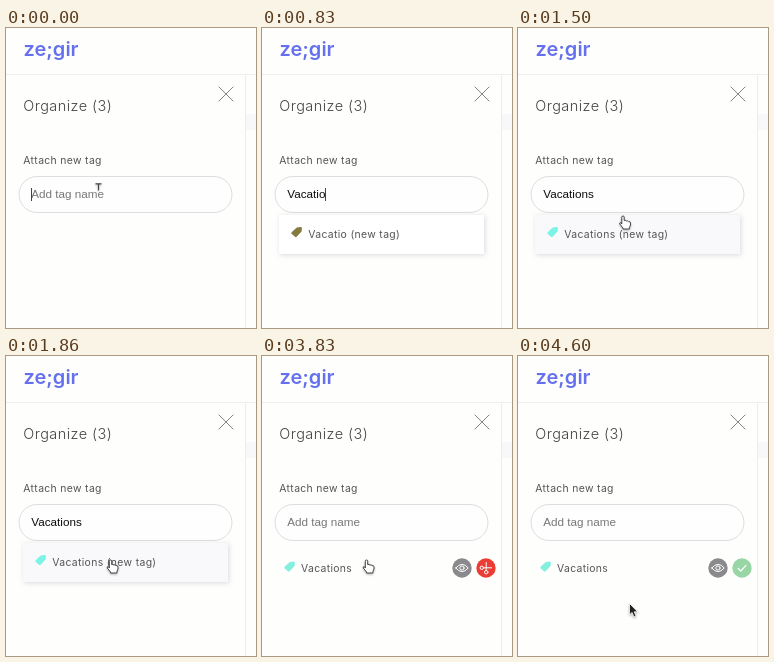
An HTML page for the animation above (4630 ms loop, 250 by 300 pixels).

```html
<!DOCTYPE html>
<html lang="en">
<head>
<meta charset="utf-8">
<title>Attach a tag</title>
<style>
  html, body { margin: 0; width: 100%; height: 100%; overflow: hidden; background: #fefefd; }
  svg { display: block; width: 250px; height: 300px; font: 10.4px Inter, sans-serif; letter-spacing: .34px; fill: #555; }
  .logo { font-size: 20px; font-weight: 600; letter-spacing: 0; fill: #6470ee; }
  .title { font-size: 14.5px; font-weight: 300; letter-spacing: .45px; fill: #444; }
  .field { font: 11.7px "Liberation Sans", Arial, sans-serif; letter-spacing: 0; }
  .box { filter: drop-shadow(1px 1px 2.5px rgba(70, 70, 110, .2)); }
  .line { fill: none; stroke-linecap: round; stroke-linejoin: round; }
  #cursor { filter: drop-shadow(0 1px 1px rgba(0, 0, 0, .3)); }
</style>
</head>
<body>
<svg viewBox="0 0 250 300">
  <defs>
    <path id="tag" d="M5.8 .6 9.6 0Q10.8 0 10.9 1.2L10.6 4.6 5.6 9.8Q4.8 10.5 4 9.8L.6 6.7Q-.1 6 .6 5.3Z"/>
  </defs>

  <rect width="250" height="300" fill="#fefefd"/>
  <path d="M0 46.5H250" stroke="#efeff0"/>
  <path d="M239.5 47V300" stroke="#eeeeef"/>
  <rect x="240" y="86" width="10" height="16" fill="#f8f8fb"/>

  <text class="logo" x="17.5" y="28">ze;gir</text>
  <text class="title" x="17.3" y="83.3">Organize (3)</text>
  <path d="M213 59 227 73M227 59 213 73" class="line" stroke="#777" stroke-width=".9"/>
  <text x="17.3" y="136">Attach new tag</text>

  <rect x="13" y="148.5" width="213" height="36" rx="18" fill="#fefefe" stroke="#dededf"/>
  <text id="value" class="field" x="25.3" y="170"></text>
  <rect id="caret" y="160" width="1" height="13" fill="#444"/>

  <g id="drop">
    <rect id="option" class="box" x="17" y="187" width="205" height="39"/>
    <use id="swatch" href="#tag" x="29" y="199"/>
    <text id="label" x="46.3" y="210"></text>
  </g>

  <g id="row">
    <use href="#tag" x="22" y="205.5" fill="#84eedf"/>
    <text x="39" y="215.7">Vacations</text>
    <circle cx="200" cy="212" r="9.7" fill="#8a898b"/>
    <g class="line" stroke="#fff">
      <path d="M193.8 212Q200 204.6 206.2 212Q200 219.4 193.8 212Z"/>
      <circle cx="200" cy="212" r="2.1"/>
    </g>
    <g id="cut">
      <circle cx="224" cy="212" r="9.7" fill="#ea3e35"/>
      <g class="line" stroke="#fff">
        <path d="M221.5 211.8H229.5M224.2 214.5V206.5"/>
        <circle cx="219.8" cy="211.8" r="1.7"/>
        <circle cx="224.2" cy="216.2" r="1.7"/>
      </g>
    </g>
    <g id="done">
      <circle cx="224" cy="212" r="9.7" fill="#98d6a6"/>
      <path d="M220 212.3 222.8 215 228 209.3" class="line" stroke="#fff" stroke-width="1.2"/>
    </g>
  </g>

  <g id="cursor">
    <path id="beam" class="line" stroke="#444" stroke-width="1.2" d="M-2.6-3.2H2.6M0-3V3"/>
    <path id="hand" fill="#fff" stroke="#444" stroke-linejoin="round"
      d="M-1.2 8V1.2Q-1.2 0 0 0T1.2 1.2V4.6Q2.6 4 3.4 5Q4.8 4.4 5.5 5.600Q7.300 5.100 7.500 7V9L6.400 11.500V13H0V12L-3.200 8Q-3.600 6.600 -2.300 6.600Z"/>
    <path id="arrow" fill="#222" stroke="#fff" stroke-width=".8" stroke-linejoin="round"
      d="M0 0V11.300L2.600 9 4.400 13.500 6.500 12.600 4.700 8.300H8.200Z"/>
  </g>
</svg>
<script>
const LOOP = 4630;
const WORD = "Vacations";
const $ = id => document.getElementById(id);
const show = (id, on) => { $(id).style.display = on ? "" : "none"; };

// time of each keystroke and the colour of its suggestion
const keys = [
  [130, "#e0a05c"], [260, "#b88ae0"], [400, "#6aa8e8"],
  [530, "#84ee9f"], [700, "#d884a8"], [765, "#8a92d8"],
  [830, "#857a40"], [960, "#a8cc70"], [1060, "#7cf3e4"]
];

// time, x, y of the pointer
const path = [
  [0, 92.5, 159], [1400, 92.5, 159], [1500, 105, 188], [1530, 105, 188.5],
  [1860, 104.5, 204], [4430, 104.5, 204], [4600, 111.5, 247.5], [LOOP, 111.5, 247.5]
];

function pointer(t) {
  const i = path.findIndex(p => p[0] > t);
  const [t0, x0, y0] = path[i - 1], [t1, x1, y1] = path[i];
  const k = (t - t0) / (t1 - t0);
  return [x0 + (x1 - x0) * k, y0 + (y1 - y0) * k];
}

const pen = document.createElement("canvas").getContext("2d");
pen.font = '11.7px "Liberation Sans", Arial, sans-serif';

function draw(t) {
  const picked = t >= 2700, added = t >= 3830;
  const count = picked ? 0 : keys.filter(k => t >= k[0]).length;
  const typed = WORD.slice(0, count);
  const [x, y] = pointer(t);

  $("value").textContent = typed || "Add tag name";
  $("value").setAttribute("fill", typed ? "#0c0c0c" : "#777");
  show("caret", t < 1460);
  $("caret").setAttribute("x", Math.round(25 + pen.measureText(typed).width));

  show("drop", count > 0);
  if (count) {
    $("label").textContent = typed + " (new tag)";
    $("swatch").setAttribute("fill", keys[count - 1][1]);
    $("option").setAttribute("fill", y > 187 ? "#f9f9fc" : "#fff");
  }

  const onRow = y < 228;
  show("row", added);
  show("cut", onRow);
  show("done", !onRow);

  const onField = y < 186;
  const link = !onField && onRow && (!picked || added);
  show("cursor", t < 130 || t >= 1400);
  show("beam", onField);
  show("hand", link);
  show("arrow", !onField && !link);
  $("cursor").setAttribute("transform", `translate(${x} ${y})`);
}

const start = performance.now();
function tick() {
  draw((performance.now() - start) % LOOP);
  requestAnimationFrame(tick);
}
tick();
</script>
</body>
</html>
```
